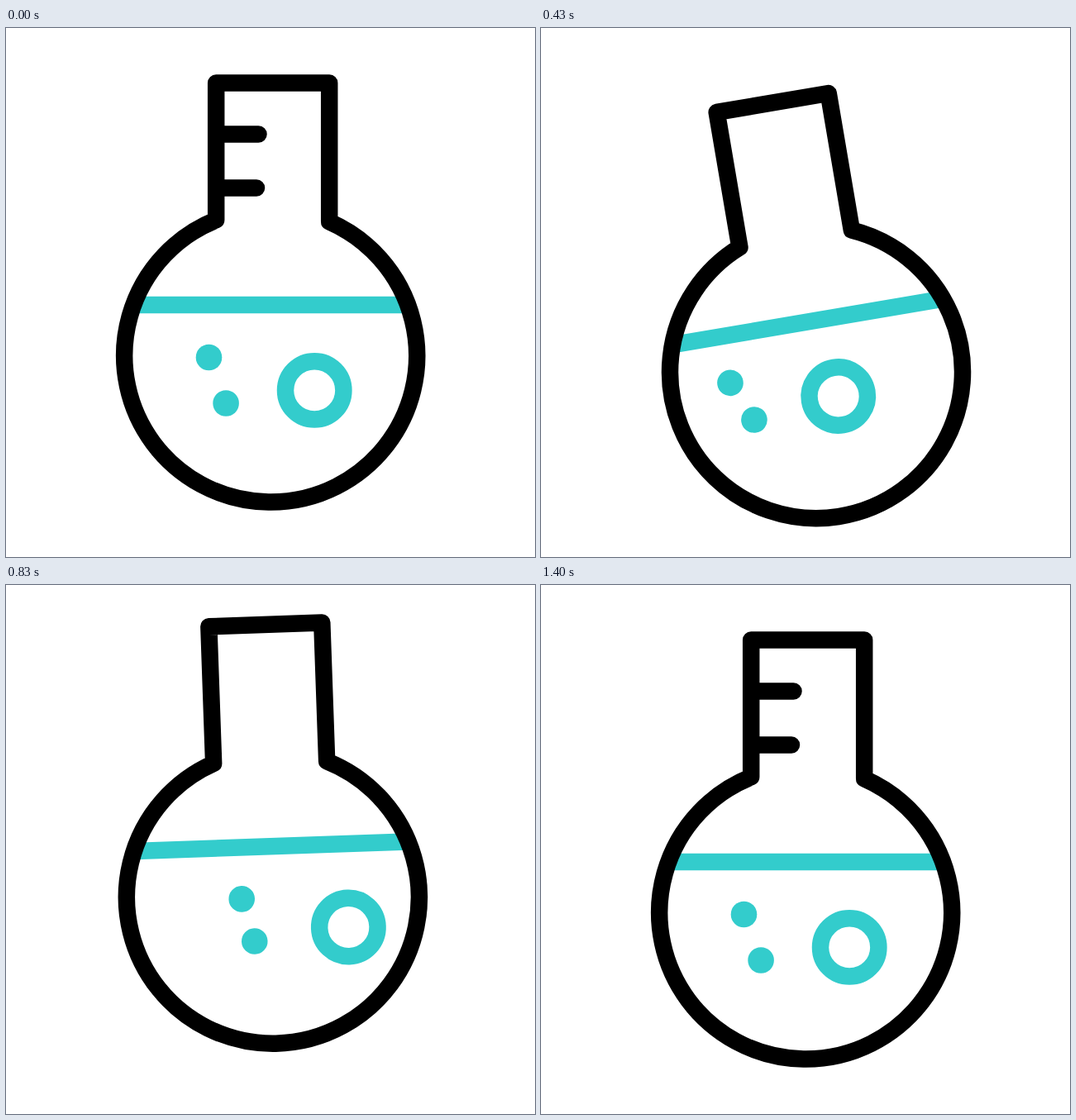
Recreate the animation shown at these times as an HTML page. Size 640 px wide and 640 px high, loop 1670 ms.

```html
<!DOCTYPE html>
<html lang="en">
<head>
<meta charset="utf-8">
<title>Shaking flask</title>
<style>
  html, body { margin: 0; width: 100%; height: 100%; overflow: hidden; background: #fff; }
  svg { display: block; width: 100%; height: 100%; }
</style>
</head>
<body>
<svg viewBox="0 0 640 640" fill="none" stroke-width="20.5">
  <clipPath id="neck"><path d="M254 66H391V236H254Z"/></clipPath>
  <g id="flask">
    <path d="M155 335H485" stroke="#3cc"/>
    <g clip-path="url(#neck)">
      <path id="ticks" d="M247 128.5H305.5M247.5 193.5H303" stroke="#000" stroke-linecap="round"/>
    </g>
    <circle class="bubble" cx="245.5" cy="398.5" r="15.8" fill="#3cc" stroke="none"/>
    <circle class="bubble" cx="266.1" cy="454" r="15.8" fill="#3cc" stroke="none"/>
    <circle class="bubble" cx="373.2" cy="438.4" r="35.2" stroke="#3cc"/>
    <path d="M254.2 232.3V66.6H391.2V234.4A177 177 0 1 1 254.2 232.3Z" stroke="#000" stroke-linejoin="round"/>
  </g>
</svg>
<script>
const LOOP = 1670, FPS = 30;
const flask = document.getElementById('flask');
const ticks = document.getElementById('ticks');
const bubbles = document.querySelectorAll('.bubble');

// How far each bubble swings left, then right, and how far it rises
const swings = [
  { left: -30.5, right: 38.3, rise: -10.5 },
  { left: -30, right: 31.3, rise: -21.5 },
  { left: -32, right: 38.5, rise: -14 },
];

// Eases in and out between [step, value] keys
function ease(t, ...keys) {
  const next = keys.findIndex(([step]) => step > t);
  if (next < 1) return keys.at(next)[1];
  const [t0, a] = keys[next - 1], [t1, b] = keys[next];
  const u = (t - t0) / (t1 - t0);
  return a + (b - a) * u * u * (3 - 2 * u);
}

function move(element, x, y, turn = 0) {
  element.setAttribute('transform', `translate(${x} ${y}) rotate(${turn} 320 320)`);
}

function draw(ms) {
  const t = Math.floor((ms % LOOP + 4) * FPS / 1000);

  const lift = ease(t, [2, 0], [11.8, 23.5], [21, -35.5], [31, 12], [38, 0]);
  const tilt = ease(t, [3.4, 0], [12.6, -9.8], [19.3, 5.3], [25.6, -2.2], [34, 0]);
  move(flask, 0, lift, tilt);

  // The ticks leave through the left wall and come back through the right one
  move(ticks, t < 20 ? ease(t, [2, 0], [17, -80]) : ease(t, [24, 152], [40.5, 0]), 0);

  swings.forEach(({ left, right, rise }, i) => move(bubbles[i],
    ease(t, [2, 0], [13.8, left], [26, right], [38, 0]),
    ease(t, [5, 0], [19, rise], [29, 4], [38, 0])));
}

const start = performance.now();
function tick() {
  draw(performance.now() - start);
  requestAnimationFrame(tick);
}
tick();
</script>
</body>
</html>
```
